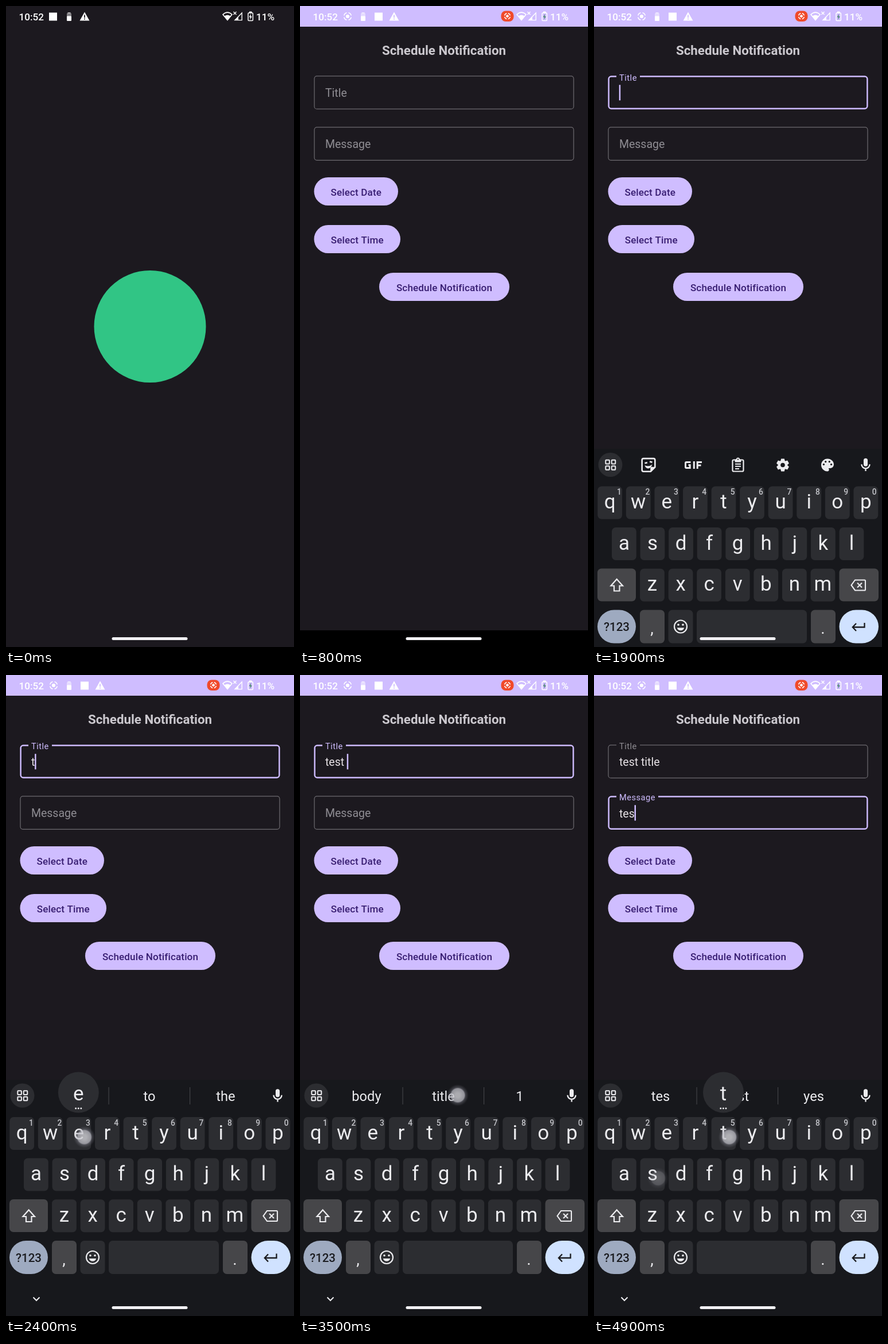
Recreate the animation shown at these times as an HTML page with a canvas. Size 502 by 1115 pixels, loop 5000 ms.

```html
<!DOCTYPE html>
<html lang="en">
<head>
<meta charset="utf-8">
<title>Schedule form</title>
<style>
html, body { margin: 0; width: 100%; height: 100%; overflow: hidden; background: #1c191f; }
canvas { display: block; width: 502px; height: 1115px; }
</style>
</head>
<body>
<canvas id="stage"></canvas>
<script>
const W = 502, H = 1115, LOOP = 5000, STEP = 100;
const BG = '#1c191f', LILAC = '#cfbdff', KEYBOARD = '#17181c';
const KEY = '#2c2d31', MOD = '#464649', INK = '#ececef';
const canvas = document.getElementById('stage');
const ctx = canvas.getContext('2d');
const dpr = window.devicePixelRatio || 1;
canvas.width = W * dpr;
canvas.height = H * dpr;

const clamp = v => Math.max(0, Math.min(1, v));
const mix = (a, b, p) => a + (b - a) * p;
const last = (list, t) => list.filter(e => e[0] <= t).pop();

// Timeline: [ms, text]
const FOCUS_TITLE = 1700, FOCUS_MESSAGE = 3900, KEYBOARD_IN = 1810;
const titleEdits = [[2300, 't'], [2500, 'te'], [2800, 'tes'], [3000, 'test'], [3200, 'test '], [3600, 'test title ']];
const messageEdits = [[4600, 't'], [4700, 'te'], [4900, 'tes']];
const presses = [[2200, 't'], [2400, 'e'], [2700, 's'], [2900, 't'], [4500, 't'], [4600, 'e'], [4800, 's'], [4900, 't']];
const taps = [[1600, 265, 152], [3100, 268, 1018], [3500, 275, 731], [3800, 262, 243]];
const hints = {
  't': ['t', 'to', 'the'],
  'te': ['te', 'ten', 'tell'],
  'tes': ['tes', 'test', 'yes'],
  'test': ['test', 'testing', 'tests'],
  'test ': ['body', 'title', '1'],
  'test title ': ['and', 'is', 'for']
};

function box(x, y, w, h, r, color) {
  ctx.beginPath();
  ctx.roundRect(x, y, w, h, r);
  ctx.fillStyle = color;
  ctx.fill();
}

function frame(x, y, w, h, r, color, width) {
  ctx.beginPath();
  ctx.roundRect(x, y, w, h, r);
  ctx.strokeStyle = color;
  ctx.lineWidth = width;
  ctx.stroke();
}

function disc(x, y, r, color) {
  ctx.beginPath();
  ctx.arc(x, y, r, 0, Math.PI * 2);
  ctx.fillStyle = color;
  ctx.fill();
}

function line(d, color, width) {
  ctx.strokeStyle = color;
  ctx.lineWidth = width;
  ctx.stroke(new Path2D(d));
}

function shape(d, color) {
  ctx.fillStyle = color;
  ctx.fill(new Path2D(d));
}

function text(str, x, y, size, color, { weight = 400, align = 'left', gap = 0 } = {}) {
  ctx.font = `${weight} ${size}px Roboto, sans-serif`;
  ctx.letterSpacing = gap + 'px';
  ctx.textAlign = align;
  ctx.fillStyle = color;
  ctx.fillText(str, x, y);
  const width = ctx.measureText(str).width;
  ctx.letterSpacing = '0px';
  return width;
}

function at(x, y, scale, draw) {
  ctx.save();
  ctx.translate(x, y);
  ctx.scale(scale, scale);
  draw();
  ctx.restore();
}

function recordMark(x, y, r) {
  disc(x, y, r * 0.48, '#fff');
  ctx.strokeStyle = '#fff';
  ctx.lineWidth = 1.5;
  for (let i = 0; i < 4; i++) {
    const a = i * Math.PI / 2 + Math.PI / 4;
    ctx.beginPath();
    ctx.arc(x, y, r, a - 0.55, a + 0.55);
    ctx.stroke();
  }
}

function warning(x, back) {
  shape(`M${x} 10.5 L${x + 8.5} 25.5 H${x - 8.5}Z`, '#fff');
  box(x - 0.9, 15.5, 1.8, 5, 0, back);
  box(x - 0.9, 21.8, 1.8, 1.8, 0, back);
}

function statusBar(inApp, recording) {
  const back = inApp ? LILAC : BG;
  if (inApp) box(0, 0, W, 36, 0, LILAC);
  text('10:52', 22.5, 25, 17.1, '#fff', { weight: 500 });
  if (recording) recordMark(83, 18, 6.5);
  box(107.5, 11, 5, 2, 0, 'rgba(255,255,255,.6)');
  box(106, 12.5, 8, 6, 1, 'rgba(255,255,255,.45)');
  box(106, 17.5, 8, 8.5, 1, '#fff');
  box((recording ? 137 : 82) - 7, 11.5, 14, 14, 0, '#fff');
  warning(recording ? 164 : 137, back);

  if (recording) {
    box(350.5, 8.5, 22, 18.5, 8, '#f04a2a');
    recordMark(361.5, 17.7, 5);
  }
  line('M386 24.5 L378 14.8 Q386 7.5 394 14.8Z', '#fff', 1.5);
  shape('M386 25 L380.2 18 Q386 13.6 391.8 18Z', '#fff');
  box(395.5, 9, 7, 7, 0, back);
  line('M396.5 10 l5 5 M401.5 10 l-5 5', '#fff', 1.4);
  line('M411.2 12 V24.6 H399Z', '#fff', 1.4);
  shape('M405 18.5 V25 H398.5Z', '#fff');
  box(424, 9.5, 4.5, 3, 0, '#fff');
  frame(422, 12, 8.4, 13.5, 1.5, '#fff', 1.5);
  shape('M427 13.5 L423.6 19.4 H425.8 L425.2 24 L428.8 18 H426.6Z', inApp ? '#4f8a76' : '#fff');
  text('11%', 436, 25, 17.1, '#fff', { weight: 500 });
}

function splash() {
  box(0, 0, W, H, 0, BG);
  disc(251, 557.5, 97.5, '#31c585');
  statusBar(false, false);
}

function field(label, top, t, focusAt, blurAt, edits) {
  const focused = t >= focusAt && t < blurAt;
  const p = 1 - (1 - clamp((t - focusAt) / 290)) ** 3;
  const tint = focused ? LILAC : '#8f8d93';
  const line = focused ? 2.44 : 1.22;
  frame(24.4 + line / 2, top + line / 2, 453.2 - line, 58.6 - line, 4.5, focused ? LILAC : '#6d6b70', line);
  if (t >= focusAt) box(39, top - 2, label === 'Title' ? 41 : 73, 7, 0, BG);
  text(label, 43.9, top + mix(37, 7.6, p), mix(19.53, 14.65, p), tint, { gap: mix(0, 0.49, p) });

  const edit = last(edits, t);
  const width = edit ? text(edit[1], 43.9, top + 37.2, 19.53, '#e6e1e5') : 0;
  const since = t - (edit ? edit[0] : focusAt);
  if (focused && since % 1000 < 500) box(43.7 + width, top + 16, 2.5, 27, 0, LILAC);
}

function button(label, x, y, w) {
  box(x, y, w, 49, 24.5, LILAC);
  text(label, x + w / 2, y + 31.5, 17.09, '#381e72', { weight: 500, align: 'center', gap: 0.12 });
}

function form(t) {
  box(0, 0, W, H, 0, BG);
  text('Schedule Notification', 251, 84.8, 22.3, '#cbc8ce', { weight: 700, align: 'center' });
  field('Title', 121.2, t, FOCUS_TITLE, FOCUS_MESSAGE, titleEdits);
  field('Message', 210.3, t, FOCUS_MESSAGE, LOOP, messageEdits);
  button('Select Date', 24.5, 298, 146.5);
  button('Select Time', 24.5, 381, 150.5);
  button('Schedule Notification', 138, 464, 227);
  statusBar(true, t >= 500);
  box(0, 1086, W, 29, 0, '#000');
}

// Letter keys: name -> centre
const keys = {};
[['qwertyuiop', 27.7, 797.5], ['asdfghjkl', 52.4, 869], ['zxcvbnm', 101.5, 940.7]].forEach(([row, x, y]) =>
  [...row].forEach((c, i) => { keys[c] = { x: x + i * 49.57, y }; }));

function tools() {
  at(95, 732, 1.08, () => {
    line('M-8 -10.5 H8 Q10.5 -10.5 10.5 -8 V3.5 L3.5 10.5 H-8 Q-10.5 10.5 -10.5 8 V-8 Q-10.5 -10.5 -8 -10.5Z', INK, 2.4);
    shape('M10.5 3 H5 Q3 3 3 5 V10.5Z', INK);
    line('M-6 -3 l4 -1 M2 -5.5 l4 1', INK, 2.4);
    shape('M-6 0.5 Q0 3.5 6 -1 Q4 5.5 -1 5.5 Q-5 5 -6 0.5Z', INK);
  });
  line('M168.5 727 H161 Q159.5 727 159.5 728.5 V735.5 Q159.5 737 161 737 H167.2 V732 H164.5 M174.3 725.5 V738.5 M180.2 738.5 V727 H188 M180.2 732.5 H186.5', INK, 3);
  at(251, 732, 1, () => {
    frame(-9.5, -9, 19, 20, 2, INK, 2.2);
    box(-5.5, -10, 11, 5, 1, INK);
    disc(0, -10, 3, INK);
    disc(0, -9.8, 1.1, KEYBOARD);
    line('M-5 -1.8 H5 M-5 2.3 H5 M-5 6.4 H2', INK, 2);
  });
  at(329, 732, 1, () => {
    disc(0, 0, 8.2, INK);
    for (let i = 0; i < 6; i++) {
      ctx.save();
      ctx.rotate(i * Math.PI / 3);
      shape('M-4 -6 L-2.8 -11 H2.8 L4 -6Z', INK);
      ctx.restore();
    }
    disc(0, 0, 3.8, KEYBOARD);
  });
  at(407, 732, 1.1, () => {
    shape('M0 -10 C-5.5 -10 -10 -5.5 -10 0 S-5.5 10 0 10 C2.2 10 3.2 7.6 1.9 5.8 C1.4 5 2 5 2.2 5 H4 C7.3 5 10 2.3 10 -1 C10 -6 5.5 -10 0 -10Z', INK);
    [[-6, -1], [-3, -5.3], [3, -5.3], [6, -1]].forEach(([x, y]) => disc(x, y, 1.5, KEYBOARD));
  });
}

function suggestions(words) {
  [116, 250, 383].forEach((x, i) => text(words[i], x, 741, 23.7, INK, { align: 'center' }));
  box(178.5, 717, 1.2, 30, 0, '#414247');
  box(320, 717, 1.2, 30, 0, '#414247');
}

function letterKeys() {
  for (const c in keys) {
    const { x, y } = keys[c];
    box(x - 21.4, y - 28.5, 42.8, 57, 7, KEY);
    text(c, x, y + 10.3, 35, INK, { align: 'center' });
  }
  [...'1234567890'].forEach((n, i) =>
    text(n, 44 + i * 49.4, 783.5, 13.8, '#c4c5ca', { align: 'center', weight: 500 }));
}

function controlKeys(spaceDown) {
  box(6, 912, 67, 57, 7, MOD);
  line('M39.7 930.5 L50 942 H44.5 V951 H35 V942 H29.5Z', INK, 2.2);
  box(427.5, 912, 68.5, 57, 7, MOD);
  line('M455 932 H471.5 Q473 932 473 933.5 V948.5 Q473 950 471.5 950 H455 L448.5 941Z M459 937 l8 8 M467 937 l-8 8', INK, 2.1);

  box(6, 984, 67, 58, 29, '#9eaac0');
  text('?123', 39.5, 1020.5, 20.5, '#1b1c20', { weight: 500, align: 'center' });
  box(80, 984, 43, 58, 7, MOD);
  text(',', 101, 1026, 28, INK, { align: 'center' });
  box(129.5, 984, 43, 58, 7, KEY);
  at(151, 1013, 1, () => {
    frame(-11, -11, 22, 22, 11, INK, 2.2);
    disc(-4, -3.2, 1.8, INK);
    disc(4, -3.2, 1.8, INK);
    shape('M-6.2 2 H6.2 A6.4 6.4 0 0 1 -6.2 2Z', INK);
  });
  box(179, 984, 192, 58, 7, spaceDown ? MOD : KEY);
  box(378, 984, 43, 58, 7, MOD);
  text('.', 399, 1026, 28, INK, { align: 'center' });
  box(427.5, 984, 68.5, 58, 29, '#d0e2ff');
  line('M471.5 1006.5 V1014 H451 M457 1007.5 L450.8 1014 L457 1020.5', '#1b1c20', 2.3);
}

function popup(c) {
  const { x, y } = keys[c];
  disc(x - 0.5, y - 71.5, 35.5, KEY);
  text(c, x - 0.5, y - 58, 35, INK, { align: 'center' });
  for (let i = -1; i < 2; i++) box(x - 2 + i * 4.6, y - 45, 2.8, 2.8, 1, INK);
}

function keyboard(t) {
  const slide = 415 * (1 - clamp((t - KEYBOARD_IN) / 245)) ** 4;
  ctx.save();
  ctx.translate(0, slide);
  box(0, 704, W, H - 704, 0, KEYBOARD);
  disc(28.5, 731.5, 21, KEY);
  for (const x of [20.3, 30.7]) for (const y of [723.3, 733.7]) frame(x, y, 6.6, 6.6, 1, INK, 2);
  at(473.5, 732, 1.18, () => {
    box(-3, -10, 6, 12, 3, INK);
    line('M-6 -1 A6 6 0 0 0 6 -1 M0 5 V9', INK, 2);
  });

  const edit = last(t < FOCUS_MESSAGE ? titleEdits : messageEdits, t);
  if (edit) suggestions(hints[edit[1]]);
  else tools();
  letterKeys();
  controlKeys(t >= 3100 && t < 3200);
  if (t >= 2000) line('M47.5 1082.5 l5.5 5.5 l5.5 -5.5', INK, 2);
  const press = presses.find(e => e[0] === t);
  if (press) popup(press[1]);
  ctx.restore();
}

function touch(x, y, age) {
  if (age < 0 || age > 100) return;
  const a = age ? 0.3 : 0.8;
  const g = ctx.createRadialGradient(x, y, 4, x, y, 19);
  g.addColorStop(0, `rgba(208,208,213,${a})`);
  g.addColorStop(0.5, `rgba(186,186,194,${a * 0.95})`);
  g.addColorStop(0.64, `rgba(150,150,162,${a * 0.4})`);
  g.addColorStop(1, 'rgba(120,120,130,0)');
  disc(x, y, 19, g);
}

function render(t) {
  ctx.setTransform(dpr, 0, 0, dpr, 0, 0);
  const entry = clamp((t - 200) / 200);
  if (entry < 1) splash();
  if (entry > 0) {
    ctx.globalAlpha = entry;
    form(t);
    ctx.globalAlpha = 1;
  }
  if (t > KEYBOARD_IN) keyboard(t);
  presses.forEach(([time, c]) => touch(keys[c].x + 9.7, keys[c].y + 6.3, t - time));
  taps.forEach(([time, x, y]) => touch(x, y, t - time));
  box(184.5, 1098, 132, 5, 2.5, '#f1f0f3');
}

const start = performance.now();
function tick() {
  const t = (performance.now() - start) % LOOP;
  render(Math.floor(t / STEP) * STEP);
  requestAnimationFrame(tick);
}
tick();
</script>
</body>
</html>
```
